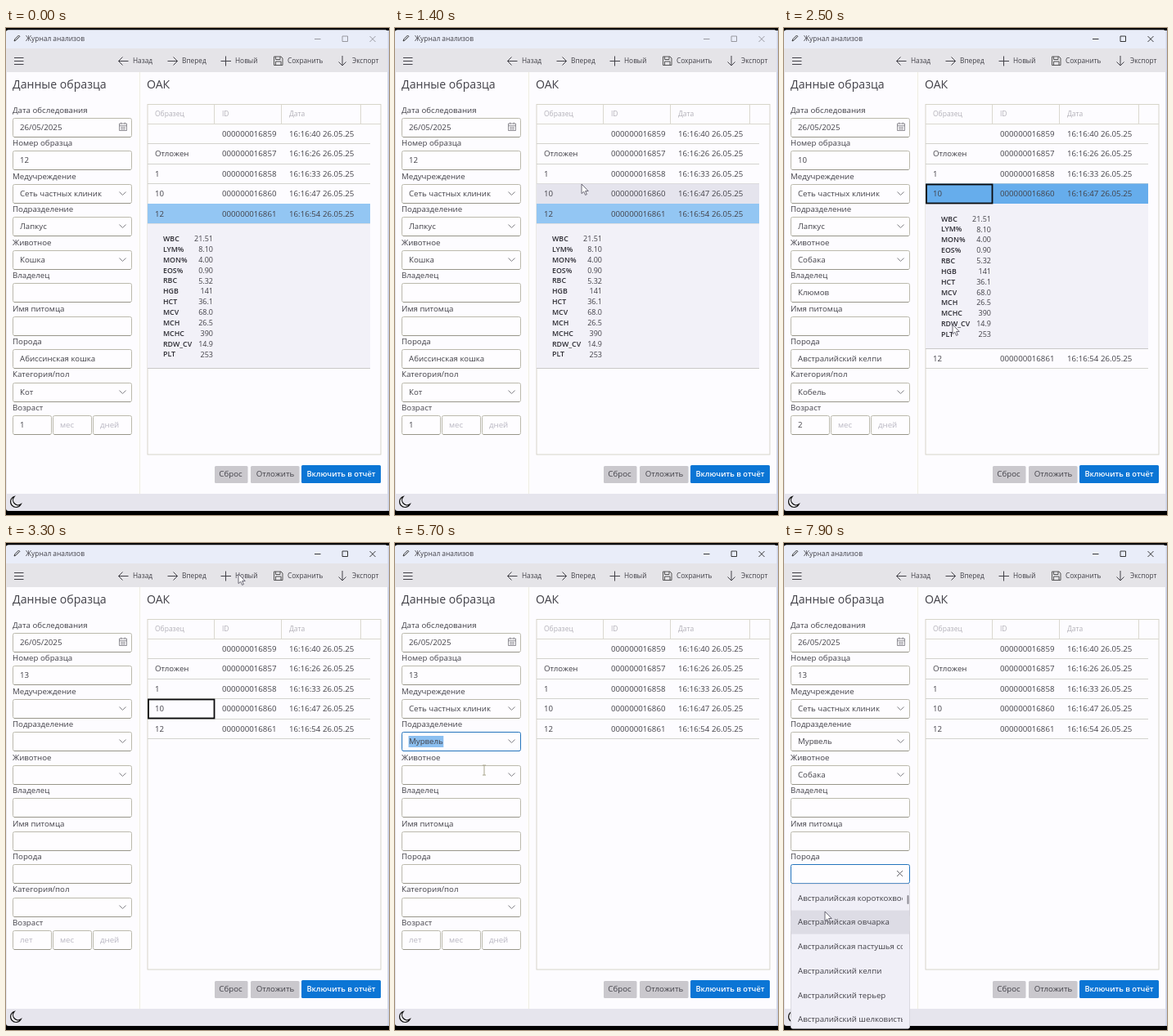
Animation of 468x596 px, one loop 8000 ms. Source, as an HTML page:

```html
<!DOCTYPE html>
<html lang="ru">
<head>
<meta charset="utf-8">
<title>Журнал анализов</title>
<style>
html, body { margin: 0; width: 100%; height: 100%; overflow: hidden; background: #000; }
svg { position: absolute; left: 0; top: 0; display: block; }
text { font-family: "Open Sans", "Noto Sans", sans-serif; white-space: pre; }
</style>
</head>
<body>
<svg width="468" height="596" viewBox="0 0 468 596">
  <defs><clipPath id="list"><rect x="8" y="0" width="137" height="596"/></clipPath></defs>
  <g id="app"></g>
  <g id="arrow"><path d="M0 0V11.6L2.7 9.2L4.6 13.4L6.4 12.6L4.6 8.5H8.2Z" fill="#fff" stroke="#5c5a68" stroke-width=".9"/></g>
  <g id="beam"><path d="M-2 -6H2M0 -6V6M-2 6H2" fill="none" stroke="#a8a58c" stroke-width="1"/></g>
</svg>
<script>
const LOOP = 8000, STEP = 100;
const INK = '#424148', PALE = '#b9b7c2', BLUE = '#2474bd';
const el = id => document.getElementById(id);
const ctx = document.createElement('canvas').getContext('2d');

const labels = ['Дата обследования', 'Номер образца', 'Медучреждение', 'Подразделение', 'Животное',
  'Владелец', 'Имя питомца', 'Порода', 'Категория/пол', 'Возраст'];
const combos = [2, 3, 4, 8];
const rows = [['', '6859', '16:16:40'], ['Отложен', '6857', '16:16:26'], ['1', '6858', '16:16:33'],
  ['10', '6860', '16:16:47'], ['12', '6861', '16:16:54']];
const results = ['WBC 21.51', 'LYM% 8.10', 'MON% 4.00', 'EOS% 0.90', 'RBC 5.32', 'HGB 141', 'HCT 36.1',
  'MCV 68.0', 'MCH 26.5', 'MCHC 390', 'RDW_CV 14.9', 'PLT 253'];
const breeds = ['короткохвостая', 'овчарка', 'пастушья собака'].map(s => 'Австралийская ' + s)
  .concat(['келпи', 'терьер', 'шелковистый терьер'].map(s => 'Австралийский ' + s));

const DATE = '26/05/2025', NET = 'Сеть частных клиник', UNITS = ['Мурвель', 'Лапкус'], PETS = ['Кошка', 'Собака'];
const form = (...v) => [DATE, ...v];

// Each step changes part of the state; later steps build on earlier ones.
const steps = [
  [0, { v: form('12', NET, UNITS[1], PETS[0], '', '', 'Абиссинская кошка', 'Кот'), age: '1',
        sel: 4, hover: -1, cell: -1, active: false, focus: -1, menu: null, pick: -1, knob: -1 }],
  [1000, { hover: 3 }],
  [1600, { v: form('10', NET, UNITS[1], PETS[1], 'Клюмов', '', 'Австралийский келпи', 'Кобель'), age: '2',
           sel: 3, cell: 3, hover: -1, active: true }],
  [3300, { v: form('13', '', '', '', '', '', '', ''), age: '', sel: -1 }],
  [4200, { knob: 2 }],
  [4500, { focus: 2, menu: [NET], cell: -1 }],
  [4700, { knob: -1, pick: 0 }],
  [4900, { v: form('13', NET, '', '', '', '', '', ''), menu: null, pick: -1 }],
  [5200, { knob: 3 }],
  [5300, { focus: 3, menu: UNITS }],
  [5400, { knob: -1, pick: 0 }],
  [5500, { v: form('13', NET, UNITS[0], '', '', '', '', ''), menu: null, pick: -1 }],
  [6000, { knob: 4 }],
  [6200, { focus: 4, menu: PETS }],
  [6400, { knob: -1, pick: 0 }],
  [6500, { pick: 1 }],
  [6700, { v: form('13', NET, UNITS[0], PETS[1], '', '', '', ''), menu: null, pick: -1 }],
  [7300, { focus: 7 }],
  [7500, { menu: breeds }],
  [7800, { pick: 1 }]
];

// time, x, y
const path = [[300, 330, 600], [1000, 228, 191], [1500, 228, 191], [1700, 224, 203], [2400, 206, 363],
  [2700, 206, 363], [3200, 284, 38], [3500, 284, 38], [4200, 143, 196], [4500, 143, 198], [4800, 90, 229],
  [4900, 90, 229], [5200, 142, 240], [5300, 142, 240], [5500, 109, 273], [5700, 109, 278], [6000, 142, 281],
  [6200, 142, 281], [6600, 76, 338], [6800, 73, 333], [7200, 62, 403], [7500, 62, 403], [7900, 50, 451]];

const rect = (x, y, w, h, fill, more = '') => `<rect x="${x}" y="${y}" width="${w}" height="${h}" fill="${fill}" ${more}/>`;
const line = (d, color = INK, w = 1) => `<path d="${d}" fill="none" stroke="${color}" stroke-width="${w}"/>`;
const text = (x, cy, s, size = 9.7, color = INK, more = '') =>
  `<text x="${x}" y="${cy + size * .35}" font-size="${size}" fill="${color}" ${more}>${s}</text>`;
const chevron = (x, y) => line(`M${x - 4} ${y - 2}l4 4l4 -4`, '#77757c', .9);

function frame(s) {
  const c = s.active ? '#222' : '#8f8f96';
  return rect(0, 0, 468, 596, '#000') + rect(464, 3, 4, 588, '#c9d0e6') +
    rect(0, 2.5, 466.5, 588.5, '#e6e5ed', 'rx="3"') +
    rect(0, 2.5, 466.5, 24, '#e9edf9', 'rx="3"') + rect(0, 25, 466.5, 29, '#e5e4e8') +
    rect(1, 54, 465, 516, '#fdfcff') + line('M163.5 54V570', '#efede0') +
    line('M10 16l1 -2.5l4.5 -4.5l1.3 1.3l-4.5 4.5z', '#333', 1) + text(24, 13.5, 'Журнал анализов', 8.4) +
    line('M377 13.5h7.5M411 10h6.5v6.5h-6.5zM444.5 10l7 7m0 -7l-7 7', c, .9) +
    line('M10 36.5h11.5M10 40.5h11.5M10 44.5h11.5') +
    line('M149.5 40.5H137.5m5 -5l-5 5l5 5M197.5 40.5h12m-5 -5l5 5l-5 5M262.5 40.5h12.5m-6.5 -6v12M411 34v12m-4.5 -4.5l4.5 4.5l4.5 -4.5') +
    line('M327.5 35h8.5l2 2v8.5h-10.5zM329.5 35v3.5h5.5v-3.5M329.5 45.5v-4.5h6.5v4.5', '#444', .9) +
    [[155, 'Назад'], [215, 'Вперед'], [280, 'Новый'], [344, 'Сохранить'], [423, 'Экспорт']]
      .map(([x, t]) => text(x, 40, t, 8.3)).join('') +
    text(8, 69, 'Данные образца', 14.1) + text(172, 69, 'ОАК', 14.1) +
    `<path d="M10 573.5a6.7 6.7 0 1 0 8.3 9.3a6.3 6.3 0 0 1 -8.3 -9.3z" fill="#fafafd" stroke="#111" stroke-width="1.2"/>`;
}

function box(x, y, w, focused) {
  return rect(x + .5, y - 11, w - 1, 23, '#fefdff', `rx="2" stroke="${focused ? BLUE : '#bbb9ac'}" stroke-width="1"`) +
    line(`M${x + 2} ${y + 12}h${w - 4}`, focused ? BLUE : '#98968a');
}

function fields(s) {
  return labels.map((name, i) => {
    // Half-pixel centres keep the box borders crisp.
    const mid = 121.5 + 40.45 * i, y = Math.floor(mid) + .5;
    let out = text(8, mid - 21, name);
    if (i === 9) {
      return out + [[8, 48, 'лет'], [57, 48, 'мес'], [106, 48, 'дней']].map(([x, w, hint], k) => {
        const val = k ? '' : s.age;
        return box(x, y, w) + text(x + 9, y + .5, val || hint, 9.7, val ? INK : PALE);
      }).join('');
    }
    const focused = s.focus === i;
    out += box(8, y, 146, focused);
    if (s.knob === i) out += rect(132, y - 10.5, 21.5, 22, '#d9d8df');
    if (focused && s.v[i]) {
      ctx.font = '9.7px "Open Sans", "Noto Sans", sans-serif';
      out += rect(16.5, y - 6.5, ctx.measureText(s.v[i]).width + 1, 14, '#8bbff0');
    }
    out += text(17, y + .5, s.v[i]);
    if (combos.includes(i)) out += chevron(142.5, y);
    if (i === 7 && focused) out += line(`M138 ${y - 3.5}l7 7m0 -7l-7 7`, '#55545c', .9);
    if (i === 0) out += line('M138.5 117h9v8.5h-9zM138.5 119.7h9M140.8 115.5v2M145.2 115.5v2M140 121.7h6M140 123.7h6', '#74737a', .8);
    return out;
  }).join('');
}

function details(top) {
  return rect(173, top, 272, 177, '#f2f1f8') + line(`M173 ${Math.floor(top + 177) + .5}h272`, '#c9c8c8') +
    results.map((r, i) => {
      const [name, val] = r.split(' '), y = top + 18.5 + 12.85 * i;
      return text(192, y, name, 8.8, '#2c2b32', 'font-weight="600"') +
        text(253, y, val, 9, INK, 'text-anchor="end"');
    }).join('');
}

function table(s) {
  let out = rect(173, 93.5, 285, 428.5, 'none', 'stroke="#d3d1c4" stroke-width=".9"') +
    line('M254.5 94V117M336.5 94V117M433.5 94V117M173 117.5H458', '#dad8cf') +
    [[182, 'Образец'], [264, 'ID'], [346, 'Дата']].map(([x, t]) => text(x, 105.5, t, 8.5, '#b2b0b8')).join('');
  let y = 117;
  rows.forEach(([name, id, time], i) => {
    const on = s.sel === i;
    if (on || s.hover === i) out += rect(173, y, 272, 24.5, on ? (i === s.cell ? '#66adec' : '#93c6f3') : '#e5e4ed');
    out += line(`M173 ${Math.floor(y + 24.5) + .5}h272`, '#cfcec9', .9);
    out += text(182, y + 12.4, name) + text(264, y + 12.4, '00000001' + id) + text(346, y + 12.4, time + ' 26.05.25');
    const top = y;
    y += 24.5;
    if (on) { out += details(y); y += 177; }
    if (s.cell === i) out += rect(174, top + 1, 80.5, 23, 'none', 'stroke="#0a0a0c" stroke-width="1.8"');
  });
  return out;
}

function buttons() {
  return rect(255, 536, 40.5, 21, '#cac8cd', 'rx="1.5"') + rect(299, 536, 59.5, 21, '#cac8cd', 'rx="1.5"') +
    rect(361, 535, 97, 22, '#0b75d5', 'rx="1.5"') +
    text(274.5, 546, 'Сброс', 9.7, INK, 'text-anchor="middle"') +
    text(329, 546, 'Отложить', 9.7, INK, 'text-anchor="middle"') +
    text(409.5, 546, 'Включить в отчёт', 9.3, '#fff', 'text-anchor="middle" font-weight="600"');
}

function menu(s) {
  if (!s.menu) return '';
  const mid = 121.5 + 40.45 * s.focus, n = s.menu.length, long = n > 3;
  const h = long ? 177 : n * 29.7 + 5;
  let out = rect(8.5, mid + 12.5, 145, h, '#f0eff7', 'rx="2" stroke="#d3d2da" stroke-width=".8"');
  s.menu.forEach((item, i) => {
    const y = mid + 29.7 * (i + 1);
    if (s.pick === i) out += rect(9, y - 14.5, 144, 29, '#dddce5');
    out += `<g clip-path="url(#list)">${text(17, y, item)}</g>`;
  });
  if (long) out += rect(150.5, 431, 2, 11, '#8d8c94', 'rx="1"');
  return out;
}

function place(t) {
  if (t < path[0][0]) return [-50, -50];
  const k = path.findIndex(p => p[0] > t);
  if (k < 0) return path[path.length - 1].slice(1);
  const a = path[k - 1], b = path[k], u = (t - a[0]) / (b[0] - a[0]), e = u * u * (3 - 2 * u);
  return [a[1] + (b[1] - a[1]) * e, a[2] + (b[2] - a[2]) * e];
}

let last = '';
function draw(now) {
  const t = Math.floor(now % LOOP / STEP) * STEP;
  const s = Object.assign({}, ...steps.filter(p => p[0] <= t).map(p => p[1]));
  const key = JSON.stringify(s);
  if (key !== last) {
    el('app').innerHTML = frame(s) + fields(s) + table(s) + buttons() + menu(s);
    last = key;
  }
  const [x, y] = place(t), typing = (t >= 5600 && t < 5900) || (t >= 7200 && t < 7600);
  el('arrow').setAttribute('transform', `translate(${typing ? -50 : x} ${y})`);
  el('beam').setAttribute('transform', `translate(${typing ? x : -50} ${y})`);
}

const start = performance.now();
function tick() {
  draw(performance.now() - start);
  requestAnimationFrame(tick);
}
tick();
</script>
</body>
</html>
```
